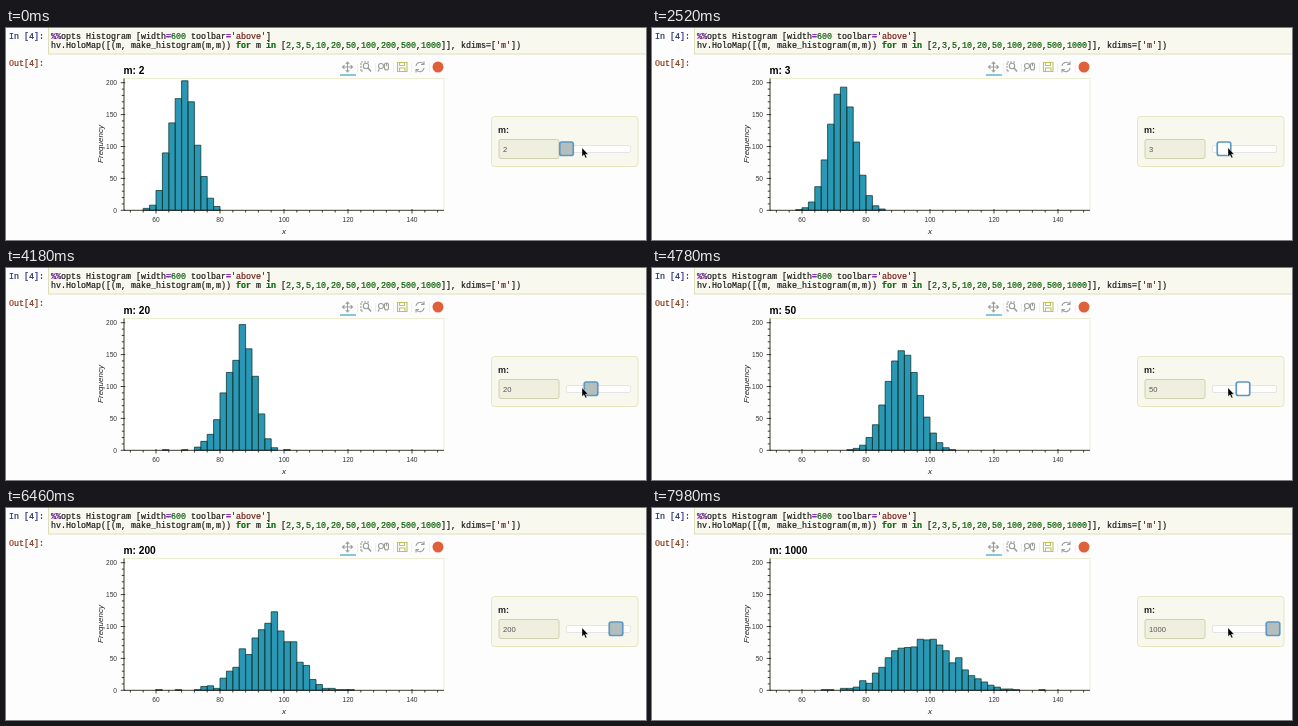
Write an HTML page that moves like this. It is 640 px wide and 212 px high and loops after 8 s.

```html
<!DOCTYPE html>
<html lang="en">
<head>
<meta charset="utf-8">
<title>Histogram slider</title>
<style>
  html, body { margin: 0; width: 100%; height: 100%; overflow: hidden; background: #fdfdfd; }
  svg { display: block; width: 640px; height: 212px; }
  text { font-family: "Liberation Sans", Arial, sans-serif; white-space: pre; fill: #222; }
  .code text { font: 8.34px "Liberation Mono", "DejaVu Sans Mono", monospace; stroke: currentColor; stroke-width: .18px; }
  .code .num { fill: #080; }
  .code .key { fill: #008000; font-weight: bold; }
  .code .op { fill: #a020f0; font-weight: bold; }
  .code .str { fill: #ba2121; }
  .tick { font-size: 6.6px; fill: #333; }
  .label { font-size: 8px; font-style: italic; text-anchor: middle; }
  .title { font-size: 10.2px; font-weight: bold; fill: #000; }
  .axis { fill: none; stroke: #111; stroke-width: .8; }
  .bars { fill: #2a98b5; stroke: #123c36; stroke-width: .8; }
  .icons { fill: none; stroke: #9a9f98; stroke-width: 1.1; }
</style>
</head>
<body>
<svg viewBox="0 0 640 212">
  <rect x="42.5" y="-2" width="600" height="28" fill="#f8f8ee" stroke="#dedebb"/>
  <g class="code">
    <text x="3" y="11" style="fill:#303f9f">In [4]:</text>
    <text x="3" y="38" style="fill:#d84315">Out[4]:</text>
    <text x="45" y="11"><tspan class="op">%%</tspan>opts Histogram [width<tspan class="op">=</tspan><tspan class="num">600</tspan> toolbar<tspan class="op">=</tspan><tspan class="str">'above'</tspan>]</text>
    <text x="45" y="20.3">hv.HoloMap([(m, make_histogram(m,m)) <tspan class="key">for</tspan> m <tspan class="key">in</tspan> [<tspan id="values"></tspan>]], kdims<tspan class="op">=</tspan>[<tspan class="str">'m'</tspan>])</text>
  </g>

  <g class="icons">
    <path d="M337 39h9M341.500 34.500v9M339.700 36l1.800-2 1.800 2M339.700 42l1.800 2 1.800-2M338.500 37.200l-2 1.800 2 1.800M344.500 37.200l2 1.800-2 1.800"/>
    <path d="M355 43v-9h8M355 43h3" stroke-dasharray="2 1"/>
    <circle cx="360" cy="38" r="2.700"/><path d="M362 40l3 3.500" stroke-width="1.600"/>
    <circle cx="375" cy="38" r="2.500"/><path d="M373.500 40.500l-1.500 3"/>
    <rect x="378.500" y="35" width="4" height="7" rx="2"/><path d="M380.500 35v3"/>
    <path d="M391.500 34.500h9.500v9h-9.500zM393.500 34.500v3h5v-3M393.500 43v-3h5.500v3" stroke="#c1c160"/>
    <path d="M410 38a4.200 4.200 0 0 1 7.500-2M418 40a4.200 4.200 0 0 1-7.500 2M418 33.500v3h-3M410 44.500v-3h3"/>
    <path d="M351.500 35v9M369.500 35v9M387.500 35v9M405.500 35v9M423.500 35v9" stroke="#ececdc" stroke-width=".8"/>
    <path d="M334 47h16" stroke="#4aa9c9" stroke-width="1.300"/>
  </g>
  <circle cx="432" cy="39" r="5.500" fill="#e0603c"/>

  <rect x="118" y="50.500" width="320" height="132" fill="#fff" stroke="#e8e8c4" stroke-width=".8"/>
  <path class="bars" id="bars"/>
  <path class="axis" id="axes"/>
  <g id="ticks"></g>
  <text class="title" id="title" x="117.500" y="46"></text>
  <text class="label" x="278" y="205.500">x</text>
  <text class="label" transform="translate(97 116) rotate(-90)">Frequency</text>

  <rect x="485.500" y="88.500" width="146.500" height="50" rx="3" fill="#f8f8ee" stroke="#e6e6c2"/>
  <text x="492" y="105" style="font-size:9px;font-weight:bold">m:</text>
  <rect x="493" y="111.500" width="60" height="19" rx="2" fill="#efefdf" stroke="#d0d0ae"/>
  <text id="field" x="497" y="124" style="font-size:7.6px;fill:#555"></text>
  <rect x="560.500" y="117.500" width="64" height="7" rx="1.500" fill="#fff" stroke="#dce0e0" stroke-width=".8"/>
  <rect id="handle" y="114" width="13.500" height="13.500" rx="2" stroke="#5f97c4" stroke-width="1.700"/>
  <path d="M576 119.800v8.800l2-1.800 1.500 3.200 1.400-.6-1.400-3.200h2.700z" fill="#000" stroke="#fff" stroke-width=".4"/>
</svg>
<script>
const LOOP = 8000, FIRST = 1950, STEP = 650, LEAD = 90;
const byId = id => document.getElementById(id);
const px = x => 118 + (x - 50) * 3.2;
const py = n => 182.3 - n * 0.638;

// Bell-shaped counts for 1000 samples in bins of width 2.
const bell = (mean, sd) => ({
  start: 56,
  counts: Array.from({ length: 40 }, (_, i) => {
    const z = (57 + 2 * i - mean) / sd;
    return Math.round(2000 / (sd * 2.5066) * Math.exp(-z * z / 2));
  })
});
const bins = (start, ...counts) => ({ start, counts });

// One entry per slider stop: value, handle centre, histogram, light handle.
const stops = [
  [2, 560.5, bins(56, 3, 8, 31, 90, 137, 175, 203, 170, 102, 53, 19, 6)],
  [3, 566, bell(72.5, 4.1)],
  [5, 572, bell(76.8, 4.2), true],
  [10, 578, bins(66, 3, 2, 13, 28, 49, 114, 161, 182, 177, 142, 82, 39, 9), true],
  [20, 585, bins(62, 1, 0, 0, 1, 0, 5, 14, 25, 48, 90, 122, 141, 197, 159, 116, 57, 18, 4, 0, 1)],
  [50, 591, bell(91.4, 5.1), true],
  [100, 597, bins(68, 1, 2, 1, 1, 6, 10, 25, 34, 45, 73, 71, 97, 118, 124, 138, 133, 120), true],
  [200, 604, bins(60, 1, 0, 0, 1, 0, 0, 1, 6, 7, 3, 19, 30, 36, 65, 56, 82, 95, 105, 123, 93,
    76, 76, 44, 39, 17, 9, 3, 3, 1, 1, 1)],
  [500, 610, bell(97.2, 9.2)],
  [1000, 621, bins(66, 1, 1, 0, 3, 3, 5, 15, 11, 27, 36, 51, 62, 66, 67, 68, 80, 79, 80, 71, 62,
    43, 51, 32, 23, 18, 13, 8, 5, 2, 2, 1, 0, 0, 0, 1)]
].map(([value, x, hist, light]) => ({ value, x, light, path: barPath(hist) }));

function barPath({ start, counts }) {
  return counts.map((n, i) => n
    ? `M${px(start + 2 * i)} ${py(0)}V${py(n)}h6.4V${py(0)}z` : '').join('');
}

function drawAxes() {
  let path = 'M118 50.5V182.3H438', labels = '';
  for (let x = 52; x < 150; x += 4) {
    const major = x % 20 === 0;
    path += `M${px(x)} ${major ? 181 : 182.3}v${major ? 4.5 : 2.2}`;
    if (major) labels += `<text class="tick" text-anchor="middle" x="${px(x)}" y="194">${x}</text>`;
  }
  for (let n = 0; n <= 200; n += 10) {
    const major = n % 50 === 0;
    path += `M${major ? 119.2 : 118} ${py(n)}h${major ? -4.5 : -2.2}`;
    if (major) labels += `<text class="tick" text-anchor="end" x="111" y="${py(n) + 2.3}">${n}</text>`;
  }
  byId('axes').setAttribute('d', path);
  byId('ticks').innerHTML = labels;
}

const stopAt = t => stops[Math.max(0, Math.min(stops.length - 1, Math.floor((t - FIRST) / STEP) + 1))];

let shown, gripped;
function render(now) {
  const t = now % LOOP, stop = stopAt(t), grip = stopAt(t + LEAD);
  if (stop !== shown) {
    byId('bars').setAttribute('d', stop.path);
    byId('title').textContent = 'm: ' + stop.value;
    byId('field').textContent = stop.value;
    shown = stop;
  }
  if (grip !== gripped) {
    byId('handle').setAttribute('x', grip.x - 6.75);
    byId('handle').setAttribute('fill', grip.light ? '#fff' : '#b3bfbd');
    gripped = grip;
  }
}

byId('values').innerHTML = stops.map(s => `<tspan class="num">${s.value}</tspan>`).join(',');
drawAxes();
const begin = performance.now();
(function frame() {
  render(performance.now() - begin);
  requestAnimationFrame(frame);
})();
</script>
</body>
</html>
```
